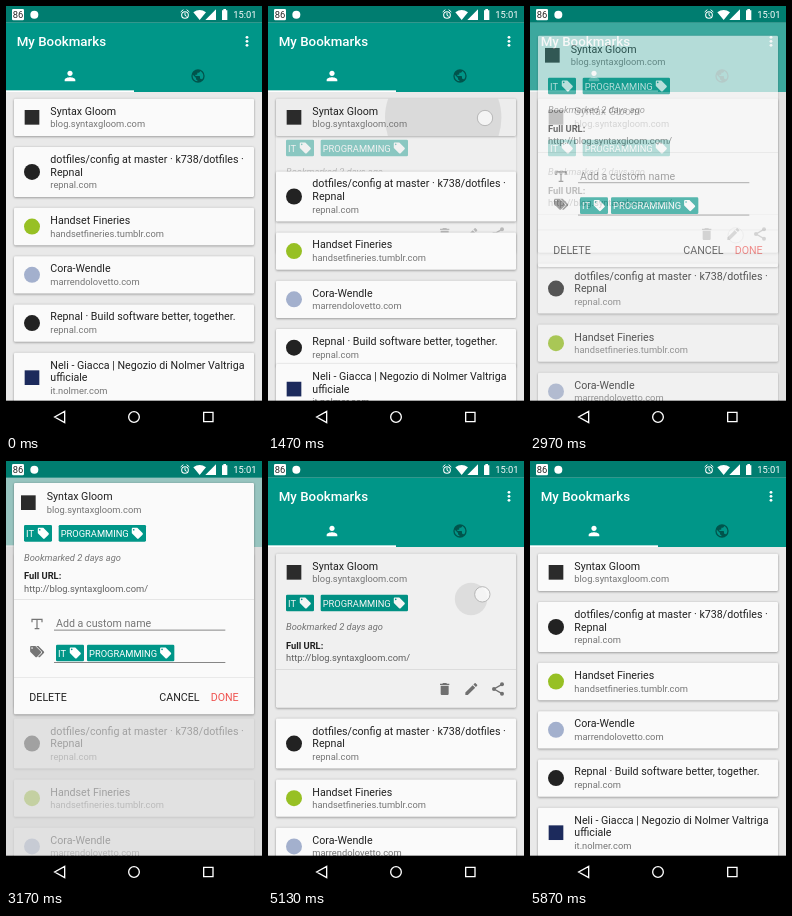
An HTML page for the animation above (5.91 s loop, 256 by 427 pixels).

```html
<!DOCTYPE html>
<html lang="en">
<head>
<meta charset="utf-8">
<title>My Bookmarks</title>
<style>
  html, body { margin: 0; width: 100%; height: 100%; overflow: hidden; background: #000; }
  svg { display: block; width: 100vw; height: 100vh; font-family: Roboto, sans-serif; }
  text { white-space: pre; }
  .card { fill: #fafafa; filter: drop-shadow(0 1.5px 1.5px rgba(0, 0, 0, .4)); }
</style>
</head>
<body>
<svg id="stage" viewBox="0 0 384 640.5" preserveAspectRatio="none"></svg>
<script>
const LOOP = 5910;
const TEAL = '#009688', GREY = '#757575', INK = '#212121';
const CARD_TOP = 139, CARD_HEIGHT = 56, LINE = 19, GROWTH = 175;

const bookmarks = [
  { lines: ['Syntax Gloom'], url: 'blog.syntaxgloom.com', mark: 'square', color: '#2b2b2b' },
  { lines: ['dotfiles/config at master · k738/dotfiles ·', 'Repnal'], url: 'repnal.com', mark: 'circle', color: '#222' },
  { lines: ['Handset Fineries'], url: 'handsetfineries.tumblr.com', mark: 'circle', color: '#97c024' },
  { lines: ['Cora-Wendle'], url: 'marrendolovetto.com', mark: 'circle', color: '#a3b0cd' },
  { lines: ['Repnal · Build software better, together.'], url: 'repnal.com', mark: 'circle', color: '#222' },
  { lines: ['Neli - Giacca | Negozio di Nolmer Valtriga', 'ufficiale'], url: 'it.nolmer.com', mark: 'square', color: '#1c2a5c' },
];

const paths = {
  person: 'M12 12c2.2 0 4-1.8 4-4s-1.8-4-4-4-4 1.8-4 4 1.8 4 4 4zm0 2c-2.7 0-8 1.3-8 4v2h16v-2c0-2.7-5.3-4-8-4z',
  globe: 'M12 2a10 10 0 1 0 0 20a10 10 0 0 0 0-20zm-1 17.9c-4-.5-7-3.8-7-7.9 0-.6.1-1.2.2-1.8L9 15v1c0 1.1.9 2 2 2zm6.9-2.5c-.3-.8-1-1.4-1.9-1.4h-1v-3c0-.6-.4-1-1-1H8v-2h2c.6 0 1-.4 1-1V7h2c1.1 0 2-.9 2-2v-.4c2.9 1.2 5 4.1 5 7.4 0 2.1-.8 4-2.1 5.4z',
  tag: 'M21.4 11.6l-9-9C12 2.2 11.5 2 11 2H4c-1.1 0-2 .9-2 2v7c0 .5.2 1 .6 1.4l9 9c.8.8 2 .8 2.8 0l7-7c.8-.8.8-2 0-2.8zM5.5 7a1.5 1.5 0 1 1 0-3a1.5 1.5 0 0 1 0 3z',
  trash: 'M6 19c0 1.1.9 2 2 2h8c1.1 0 2-.9 2-2V7H6zM19 4h-3.5l-1-1h-5l-1 1H5v2h14z',
  pencil: 'M3 17.25V21h3.75L17.8 9.94l-3.75-3.75zM20.7 7c.4-.4.4-1 0-1.4l-2.3-2.3c-.4-.4-1-.4-1.4 0l-1.9 1.8 3.75 3.75z',
};

const text = (x, y, string, size = 16, fill = INK, extra = '') =>
  `<text x="${x}" y="${y}" font-size="${size}" fill="${fill}" ${extra}>${string}</text>`;
const rect = (x, y, w, h, fill, extra = '') =>
  `<rect x="${x}" y="${y}" width="${w}" height="${h}" fill="${fill}" ${extra}/>`;
const dot = (x, y, r, fill, extra = '') => `<circle cx="${x}" cy="${y}" r="${r}" fill="${fill}" ${extra}/>`;
const stroke = (d, color, width) => `<path d="${d}" fill="none" stroke="${color}" stroke-width="${width}"/>`;
const icon = (name, x, y, fill, size = 24) =>
  `<path d="${paths[name]}" fill="${fill}" transform="translate(${x - size / 2} ${y - size / 2}) scale(${size / 24})"/>`;
const cardRect = (y, h, id = '') => `<rect ${id} class="card" x="12" y="${y}" width="360" height="${h}" rx="2"/>`;
const mark = ({ mark, color }, x, y) =>
  mark === 'circle' ? dot(x, y, 12, color) : rect(x - 11, y - 11, 22, 22, color);
const chip = (x, y, w, label) =>
  rect(x, y, w, 25, TEAL, 'rx="2"') + text(x + 3, y + 18, label, 14, '#fff') + icon('tag', x + w - 13, y + 12.5, '#fff', 20);
const chips = (x, y, gap) => chip(x, y, 42, 'IT') + chip(x + 42 + gap, y, 131, 'PROGRAMMING');

function heading(item, top, x = 66.5) {
  const height = CARD_HEIGHT + (item.lines.length - 1) * LINE;
  return mark(item, x - 27.5, top + height / 2) +
    item.lines.map((line, i) => text(x, top + 24 + i * LINE, line)).join('') +
    text(x, top + height - 13, item.url, 14, GREY);
}

const details = top =>
  chips(27, top + 61.5, 10) +
  text(27, top + 115, 'Bookmarked 2 days ago', 14, GREY, 'font-style="italic"') +
  text(27, top + 143, 'Full URL:', 14, INK, 'font-weight="700"') +
  text(27, top + 161.5, `http://${bookmarks[0].url}/`, 14, '#616161') +
  rect(12, top + 173, 360, 1, '#dcdcdc');

const share = (x, y) => `<g transform="translate(${x - 12} ${y - 12})">` +
  stroke('M18 5 6 12l12 7', GREY, 2) + dot(18, 5, 3, GREY) + dot(6, 12, 3, GREY) + dot(18, 19, 3, GREY) + '</g>';

function list() {
  let top = CARD_TOP;
  return bookmarks.map((item, i) => {
    const height = CARD_HEIGHT + (item.lines.length - 1) * LINE;
    const card = i ? `<g id="card${i}">${cardRect(top, height)}${heading(item, top)}</g>` : '';
    top += height + 16.4;
    return card;
  }).join('');
}

const header =
  rect(0, 25, 384, 104, TEAL) + text(16, 60.5, 'My Bookmarks', 20, '#fff', 'font-weight="500"') +
  [47, 53, 59].map(y => dot(361.5, y, 2.1, '#fff')).join('') +
  icon('person', 96, 105, '#fff') + icon('globe', 288, 105, '#00544c') + rect(0, 126.5, 192, 2.5, '#fff');

const statusBar =
  rect(0, 0, 384, 25, '#007d70') + rect(9, 4.5, 18, 17, '#fff', 'rx="2"') +
  text(10, 18, '86', 14, '#222') + dot(42.5, 13, 6, '#fff') +
  dot(268.5, 13.5, 5, 'none', 'stroke="#fff" stroke-width="1.6"') +
  stroke('M268.5 10v4l2.5 1.5M262 9l4-3.5M275 9l-4-3.5', '#fff', 1.5) +
  '<path d="M281 9.5q9.5-7 19 0L290.5 21zM315 5v16h-16zM324 6.5h2v-2h4v2h2V21h-8z" fill="#fff"/>' +
  text(341, 18, '15:01', 14, '#fff');

const navBar = rect(0, 592, 384, 49, '#000') +
  stroke('M88 608v17l-15-8.5zM296.5 609.5h14v14h-14z', '#fff', 2) +
  dot(192, 616.5, 8, 'none', 'stroke="#fff" stroke-width="2"');

const dialog = cardRect(33, 347) + heading(bookmarks[0], 34.5, 61) + details(34.5) +
  stroke('M39 242v-4.5h15v4.5M46.5 237.5v14M43 251.5h7', GREY, 1.8) +
  text(75, 249.5, 'Add a custom name', 16, GREY) + rect(72, 253, 257, 1.3, GREY) +
  icon('tag', 49, 286, GREY, 20) + icon('tag', 44.5, 286, '#fafafa', 23) + icon('tag', 44.5, 286, GREY, 20) +
  chips(75, 275.5, 4.5) + rect(72, 301.5, 257, 1.3, GREY) +
  rect(12, 324, 360, 1, '#e2e2e2') +
  text(35, 360.5, 'DELETE') + text(230, 360.5, 'CANCEL') + text(307, 360.5, 'DONE', 16, '#ef5350');

stage.innerHTML =
  `<clipPath id="clip"><rect id="clipRect" x="12" y="${CARD_TOP}" width="360" height="56"/></clipPath>` +
  rect(0, 0, 384, 641, '#e9e9e9') +
  `<g id="expanded">${cardRect(CARD_TOP, CARD_HEIGHT + GROWTH)}${details(CARD_TOP)}` +
  icon('trash', 265, 342, GREY) + icon('pencil', 305, 342, GREY) + share(345, 342) + '</g>' +
  cardRect(CARD_TOP, CARD_HEIGHT, 'id="collapsed"') +
  `<g id="ripple" clip-path="url(#clip)">${rect(12, CARD_TOP, 360, 231, '#000', 'opacity=".04"')}` +
  dot(0, 0, 0, '#000', 'id="wave" opacity=".08"') + '</g>' +
  heading(bookmarks[0], CARD_TOP) + list() + header +
  rect(0, 25, 384, 567, '#d7d7d7', 'id="shade"') + `<g id="dialog">${dialog}</g>` +
  dot(0, 0, 11.5, '#fafafa', 'id="finger" fill-opacity=".8" stroke="#aaa" stroke-width="1.2"') +
  statusBar + navBar;

const touches = [
  { x: 325.5, y: 168, from: 870, to: 1560 },
  { x: 308.5, y: 344, from: 2370, to: 2870 },
  { x: 328, y: 355, from: 3700, to: 4100 },
  { x: 321.5, y: 200, from: 4730, to: 5420 },
];
const ripples = [
  { touch: touches[0], from: 1055, fade: 1500, height: CARD_HEIGHT },
  { touch: touches[3], from: 5015, fade: 5400, height: CARD_HEIGHT + GROWTH },
];

const el = id => document.getElementById(id);
const set = (id, attrs) => Object.entries(attrs).forEach(([key, value]) => el(id).setAttribute(key, value));
const ramp = (t, from, length) => Math.min(1, Math.max(0, (t - from) / length));

// The CSS "ease" curve, cubic-bezier(.25, .1, .25, 1).
function ease(x) {
  const curve = (a, b, s) => 3 * a * s * (1 - s) ** 2 + 3 * b * s * s * (1 - s) + s ** 3;
  let low = 0, high = 1;
  for (let i = 0; i < 20; i++) {
    const mid = (low + high) / 2;
    if (curve(.25, .25, mid) < x) low = mid; else high = mid;
  }
  return curve(.1, 1, low);
}

const opened = t => ease(ramp(t, 1390, 500)) - ease(ramp(t, 5350, 500));

function draw(t) {
  for (let i = 1; i < bookmarks.length; i++) {
    const delay = i === 5 ? 30 : 0;
    set('card' + i, { transform: `translate(0 ${GROWTH * opened(t - delay)})` });
  }
  set('expanded', { opacity: ramp(t, 1390, 200) - ramp(t, 5350, 200) });
  set('collapsed', { opacity: 1 - opened(t) });

  const { touch, from, fade, height } = ripples[t < 3000 ? 0 : 1];
  const r = Math.max(0, (t - from) * .21), drift = Math.min(1, r / 186);
  set('clipRect', { height });
  set('ripple', { opacity: ramp(t, from, 100) * (1 - ramp(t, fade, 300)) });
  set('wave', {
    r,
    cx: touch.x + (192 - touch.x) * drift,
    cy: touch.y + (CARD_TOP + height / 2 - touch.y) * drift,
  });

  const opening = ramp(t, 2840, 330), closing = ramp(t, 4130, 300);
  const hidden = (1 - opening) ** 2 + closing ** 2;
  set('shade', { opacity: .7 * (opening - closing) });
  set('dialog', { opacity: 1 - hidden, transform: `translate(0 ${21 * 1.5 * hidden})` });

  const finger = touches.find(touch => t < touch.to + 120) || touches[3];
  set('finger', {
    cx: finger.x,
    cy: finger.y,
    opacity: ramp(t, finger.from - 100, 200) * (t >= finger.from) * (1 - ramp(t, finger.to, 120)),
  });
}

const start = performance.now();
function tick() {
  draw((performance.now() - start) % LOOP);
  requestAnimationFrame(tick);
}
tick();
</script>
</body>
</html>
```
